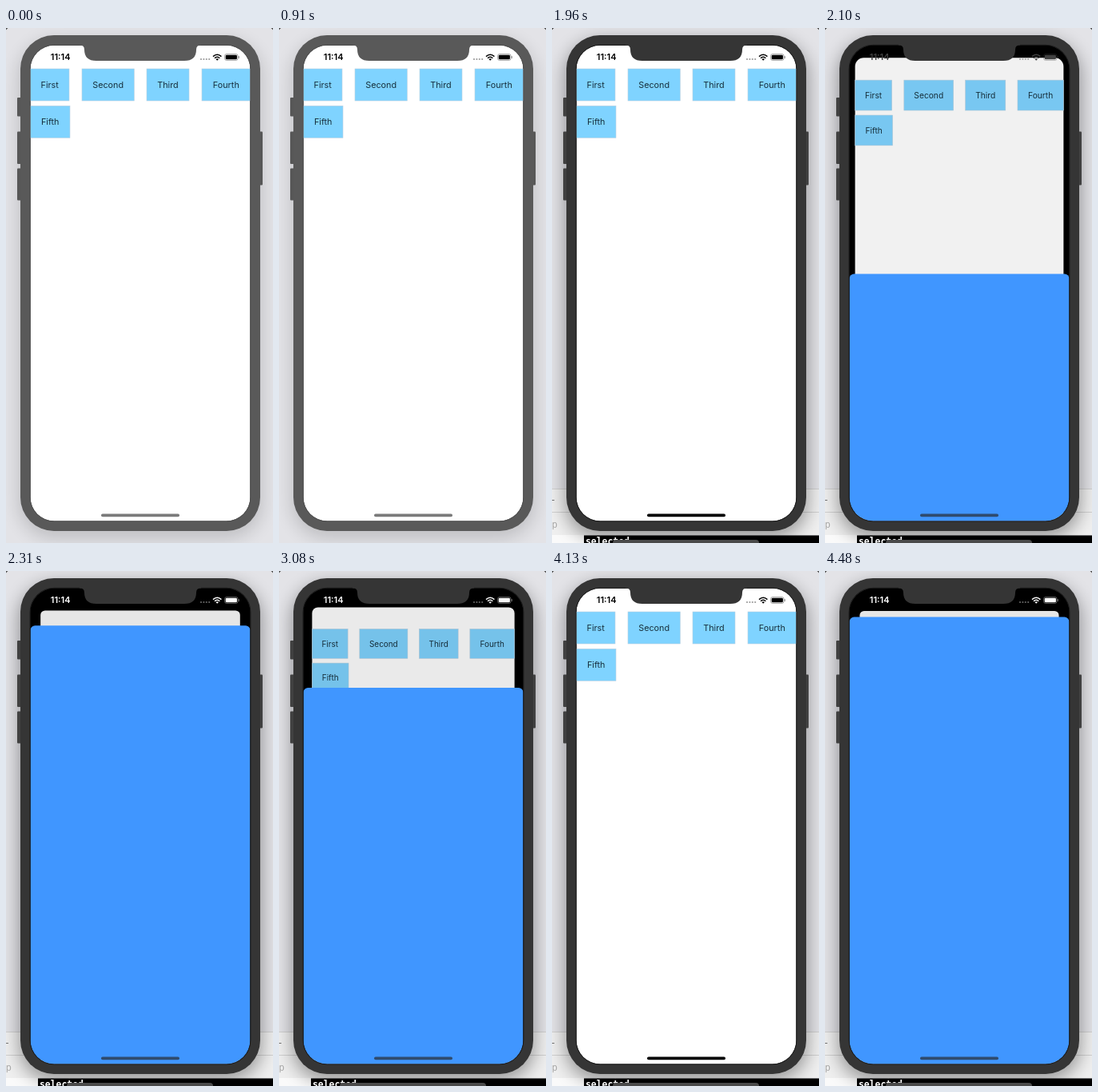
Animation of 334 by 644 pixels, one loop 4900 ms. Source, as an HTML page:

```html
<!DOCTYPE html>
<html lang="en">
<head>
<meta charset="utf-8">
<title>Sheet presentation</title>
<style>
  html, body { margin: 0; width: 100%; height: 100%; overflow: hidden; background: #e3e3e7; }
  svg { display: block; width: 100%; height: 100%; font-family: Inter, Roboto, sans-serif; }
  #stage { --case: #595959; --button: #575757; --shadow: .16; }
  #stage.active { --case: #353535; --button: #414141; --shadow: .36; }
  #desktop { display: none; }
  .active #desktop { display: inline; }
  #ring { stroke: #4d4d4d; }
  .active #ring { stroke: #171717; }
  #dock { fill: #383838; }
  .active #dock { fill: #4a4a4a; }
  .case { fill: var(--case); }
  .side { fill: var(--button); }
  #shadow { opacity: var(--shadow); }
  .label { font-size: 10.8px; fill: #17303d; text-anchor: middle; }
</style>
</head>
<body>
<svg id="stage" viewBox="0 0 334 644" preserveAspectRatio="none">
  <defs>
    <filter id="blur" x="-20%" y="-20%" width="140%" height="140%"><feGaussianBlur stdDeviation="11"/></filter>
    <clipPath id="screen"><rect x="30.4" y="21.6" width="275.2" height="595" rx="30"/></clipPath>
  </defs>

  <rect width="334" height="644" fill="#e3e3e7"/>
  <g id="desktop">
    <rect y="576" width="334" height="58" fill="#efefef"/>
    <path d="M0 576.5H334M0 605.5H334" stroke="#cfcfcf"/>
    <rect y="634" width="40" height="10" fill="#fafafa"/>
    <path d="M0 590.5H3" stroke="#777"/>
    <text x="0" y="625" font-size="11" fill="#a9a9a9">p</text>
  </g>
  <rect id="shadow" x="16" y="16" width="304" height="622" rx="44" filter="url(#blur)"/>
  <g id="desktop-console" display="none">
    <rect x="40" y="634.5" width="294" height="10"/>
    <text x="42" y="645.5" font-size="11.4" font-weight="700" fill="#fff"
      font-family="DejaVu Sans Mono, monospace">selected</text>
  </g>
  <rect id="dock" x="76" y="640" width="183" height="12" rx="4"/>
  <path d="M0 0H2.5L0 2.5ZM334 0H331.5L334 2.5Z" fill="#555"/>

  <g class="side">
    <rect x="14" y="87" width="6" height="23.5" rx="1"/>
    <rect x="14" y="129.5" width="6" height="40.5" rx="1"/>
    <rect x="14" y="175.5" width="6" height="40" rx="1"/>
    <rect x="316" y="129.5" width="5" height="67" rx="1"/>
  </g>
  <rect class="case" x="18" y="9" width="300" height="620" rx="42"/>

  <g clip-path="url(#screen)">
    <rect x="30" y="21" width="276" height="597"/>
    <g id="card">
      <rect id="page" x="30.4" y="21.6" width="275.2" height="640" fill="#fff"/>
      <g id="buttons"></g>
      <rect id="dim" x="30" y="21.6" width="276" height="640"/>
    </g>
    <rect id="sheet" x="30.4" width="275.2" height="640" rx="6" fill="#4096ff"/>
    <rect id="home" x="119" y="607.6" width="98" height="3.6" rx="1.8"/>
    <g id="status">
      <text x="55.8" y="40.2" font-size="11" font-weight="600">11:14</text>
      <g opacity=".4">
        <circle cx="244" cy="39" r="1.1"/><circle cx="247.4" cy="39" r="1.1"/>
        <circle cx="250.8" cy="39" r="1.1"/><circle cx="254.2" cy="39" r="1.1"/>
      </g>
      <g fill="none" stroke="currentColor" stroke-width="1.5">
        <path d="M259 35.6Q264.2 31 269.4 35.6M261 37.7Q264.2 34.9 267.4 37.7"/>
      </g>
      <path d="M262.4 38.9Q264.2 37.4 266 38.9L264.2 40.7Z"/>
      <rect x="273.6" y="32.6" width="16.4" height="7.8" rx="2.2" fill="none" stroke="currentColor" stroke-width=".7" opacity=".5"/>
      <rect x="274.7" y="33.7" width="14.2" height="5.6" rx="1.3"/>
      <rect x="290.7" y="35.1" width="1" height="2.8" rx=".5" opacity=".5"/>
    </g>
  </g>
  <rect id="ring" x="30.1" y="21.3" width="275.8" height="595.6" rx="30" fill="none" stroke-width=".9"/>
  <path class="case" d="M92 20H244V21.6Q238 21.6 238 27Q238 41 223 41H113Q98 41 98 27Q98 21.6 92 21.6Z"/>
</svg>

<script>
const LOOP = 4900, STEP = 70;
const ACTIVATE = 1890, DOCK = 1190;
const FIRST = 2000, DRAG = 2870, RELEASE = 3080, SECOND = 4130;
const OPEN = 56, CLOSED = 617, TRAVEL = CLOSED - OPEN, PULL = 90;

const $ = id => document.getElementById(id);
const clamp = x => Math.min(1, Math.max(0, x));
const mix = (a, b, k) => a + (b - a) * k;
const rgb = (a, b, k) => `rgb(${a.map((v, i) => Math.round(mix(v, b[i], k)))})`;

const buttons = [
  ["First", 30.4, 51, 48.6], ["Second", 95, 51, 65.3], ["Third", 176, 51, 53],
  ["Fourth", 245, 51, 60.6], ["Fifth", 30.4, 97.3, 49.6]
];
$("buttons").innerHTML = buttons.map(([name, x, y, w]) => `
  <rect x="${x}" y="${y}" width="${w}" height="40" fill="#7fd3ff" stroke="#b9cfdf" stroke-width=".6"/>
  <text class="label" x="${x + w / 2}" y="${y + 24}">${name}</text>`).join("");

// Critically damped spring: remaining distance after ms, with optional starting speed (px/s).
function spring(distance, ms, rate, speed = 0) {
  const s = Math.max(0, ms) / 1000;
  return (distance + (rate * distance - speed) * s) * Math.exp(-rate * s);
}

function sheetTop(t) {
  if (t < DRAG) return OPEN + spring(TRAVEL, t - FIRST, 18.5);
  if (t < RELEASE) return OPEN + PULL * ((t - DRAG) / (RELEASE - DRAG)) ** 2;
  if (t < 3640) {
    const speed = 2 * PULL / (RELEASE - DRAG) * 1000;
    return CLOSED - spring(TRAVEL - PULL, t - RELEASE, 18, speed);
  }
  return OPEN + spring(TRAVEL, t - SECOND, 23);
}

function draw(t) {
  const active = t >= ACTIVATE;
  const top = sheetTop(t);
  const p = clamp((CLOSED - top) / TRAVEL);

  $("stage").classList.toggle("active", active);
  $("desktop-console").setAttribute("display", active ? "inline" : "none");
  $("dock").setAttribute("visibility", t >= DOCK ? "visible" : "hidden");

  $("card").setAttribute("transform",
    `translate(168 ${mix(21.6, 50, p)}) scale(${mix(1, .905, p)}) translate(-168 -21.6)`);
  const radius = p > 0 ? mix(18, 6, p) : 0;
  $("page").setAttribute("rx", radius);
  $("dim").setAttribute("rx", radius);
  $("dim").setAttribute("opacity", .1 * p);
  $("sheet").setAttribute("y", top);
  $("sheet").setAttribute("visibility", p > 0 ? "visible" : "hidden");

  const ink = rgb([0, 0, 0], [255, 255, 255], clamp((p - .45) / .4));
  $("status").setAttribute("fill", ink);
  $("status").setAttribute("color", ink);
  $("home").setAttribute("fill", active ? rgb([0, 0, 0], [47, 75, 110], clamp(p * 3)) : "#7a7a7a");
}

const start = performance.now();
function tick() {
  const t = (performance.now() - start) % LOOP;
  draw(Math.floor(t / STEP) * STEP);
  requestAnimationFrame(tick);
}
tick();
</script>
</body>
</html>
```
